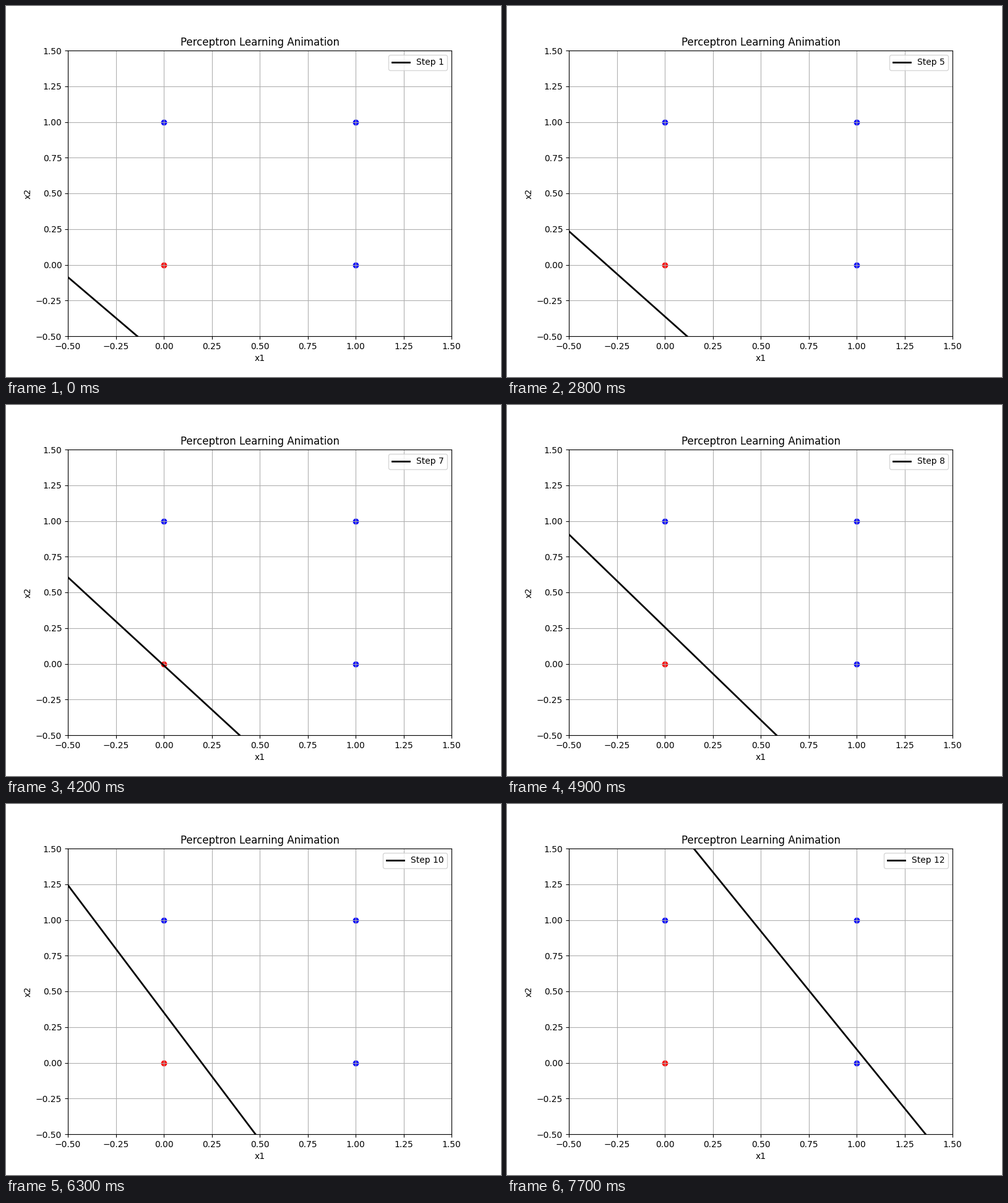
Animation, 800 px wide and 600 px high, one loop 8000 ms. Source, as a matplotlib script:

```python
import matplotlib.pyplot as plt
import numpy as np
from matplotlib.animation import FuncAnimation

INTERVAL = 100       # ms per frame
HOLD = 7             # frames per learning step
FRAMES = 80
START = (8.785, 7.683, 5.055)    # w1, w2, bias in units of the learning rate

POINTS = np.array([[0, 0], [0, 1], [1, 0], [1, 1]])
LABELS = np.array([1, 0, 0, 0])


def train(steps):
    """Weights after each single-sample perceptron update."""
    w = np.array(START)
    history = []
    for i in range(steps):
        k = i % len(POINTS)
        x = np.append(POINTS[k], 1)
        w = w + (LABELS[k] - int(w @ x >= 0)) * x
        history.append(w)
    return history


history = train(-(-FRAMES // HOLD))
xs = np.array([-0.5, 1.5])

fig, ax = plt.subplots(figsize=(8, 6), dpi=100)
fig.subplots_adjust(left=0.125, right=0.9, bottom=0.11, top=0.88)
ax.set(xlim=(-0.5, 1.5), ylim=(-0.5, 1.5), xlabel="x1", ylabel="x2",
       title="Perceptron Learning Animation")
ax.grid(True)
for point, label in zip(POINTS, LABELS):
    ax.scatter(*point, color="red" if label else "blue")
line, = ax.plot([], [], color="black", lw=2)


def update(frame):
    step = frame // HOLD
    w1, w2, b = history[step]
    line.set_data(xs, -(w1 * xs + b) / w2)
    line.set_label(f"Step {step + 1}")
    ax.legend(loc="upper right")
    return line,


anim = FuncAnimation(fig, update, frames=FRAMES, interval=INTERVAL,
                     repeat=True, repeat_delay=0, blit=False)
plt.show()
```
